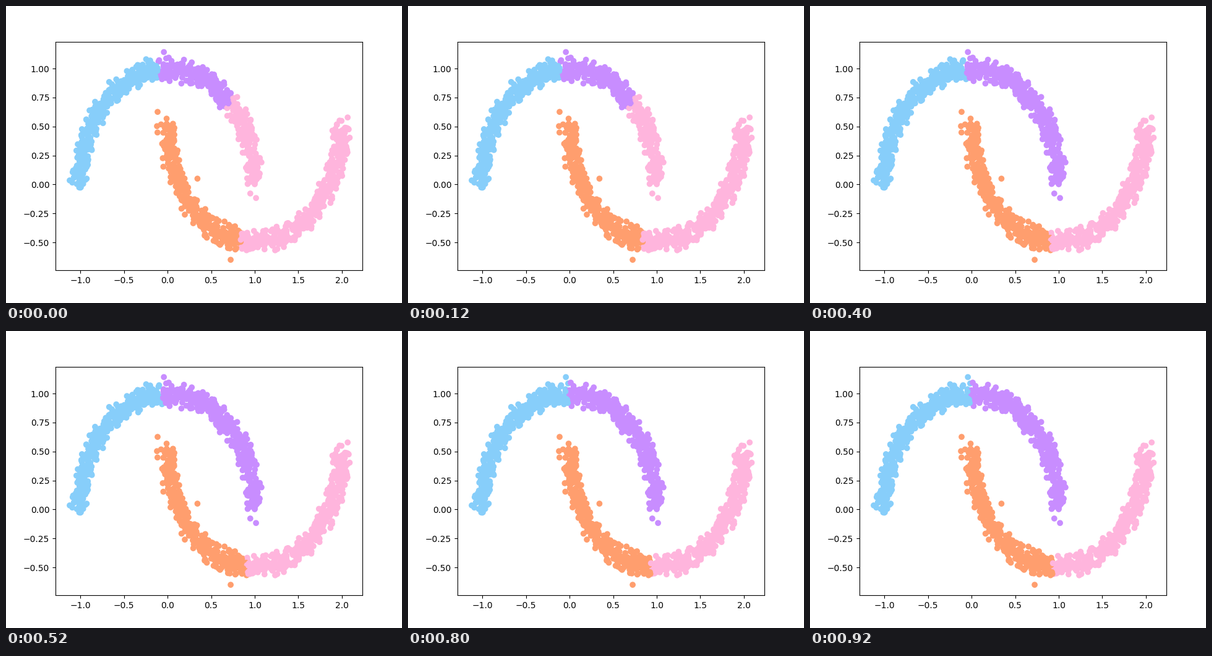
A matplotlib script that plays this animation: 640x480 px, repeating every 1000 ms.

```python
import numpy as np
import matplotlib.pyplot as plt
from matplotlib.animation import FuncAnimation

BLUE, PURPLE, ORANGE, PINK = "#87CEFA", "#C88DFF", "#FF9E6E", "#FFB5DD"
STEPS = 5
PER_MOON, NOISE, REACH = 750, 0.05, 2.4

# The few points that stray furthest from each moon
UPPER_STRAYS = [(-0.042, 1.142), (-1.122, 0.035), (1.015, -0.117)]
LOWER_STRAYS = [(0.343, 0.05), (-0.114, 0.626), (-0.121, 0.503),
                (0.724, -0.65), (2.066, 0.578)]

rng = np.random.default_rng(7)


def jitter(count):
    """Gaussian offsets cut off at REACH standard deviations."""
    u = rng.random(count) * (1 - np.exp(-REACH**2 / 2))
    radius = NOISE * np.sqrt(-2 * np.log(1 - u))
    angle = rng.uniform(0, 2 * np.pi, count)
    return np.column_stack([radius * np.cos(angle), radius * np.sin(angle)])


def moon(xs, ys, strays):
    return np.vstack([np.column_stack([xs, ys]) + jitter(len(xs)), strays])


t = np.linspace(0, np.pi, PER_MOON)
upper = moon(np.cos(t), np.sin(t), UPPER_STRAYS)
lower = moon(1 - np.cos(t), 0.5 - np.sin(t), LOWER_STRAYS)

points = np.vstack([upper, lower])
is_upper = np.arange(len(points)) < len(upper)
order = rng.permutation(len(points))
x, y = points[order].T
is_upper = is_upper[order]


def cluster_colors(step):
    """Both splits settle geometrically towards their final places."""
    upper_split = -0.175 / 3 ** (step - 1) if step else -0.11
    lower_split = 0.94 - 0.1 * 0.58**step
    left = x < upper_split * (1 - 1.4 * (1 - y))
    colors = np.where(is_upper,
                      np.where(left, BLUE, PURPLE),
                      np.where(x < lower_split, ORANGE, PINK))
    if step == 0:  # pink still holds the right arm of the upper moon
        colors[is_upper & (x > 0.4) & (y < x)] = PINK
    return colors


fig, ax = plt.subplots(figsize=(6.4, 4.8), dpi=100)
ax.set(xlim=(-1.285, 2.235), ylim=(-0.741, 1.232))
dots = ax.scatter(x, y, c=cluster_colors(0))


def update(step):
    dots.set_color(cluster_colors(step))
    return (dots,)


anim = FuncAnimation(fig, update, frames=STEPS, interval=200,
                     repeat=True, repeat_delay=0)
plt.show()
```
